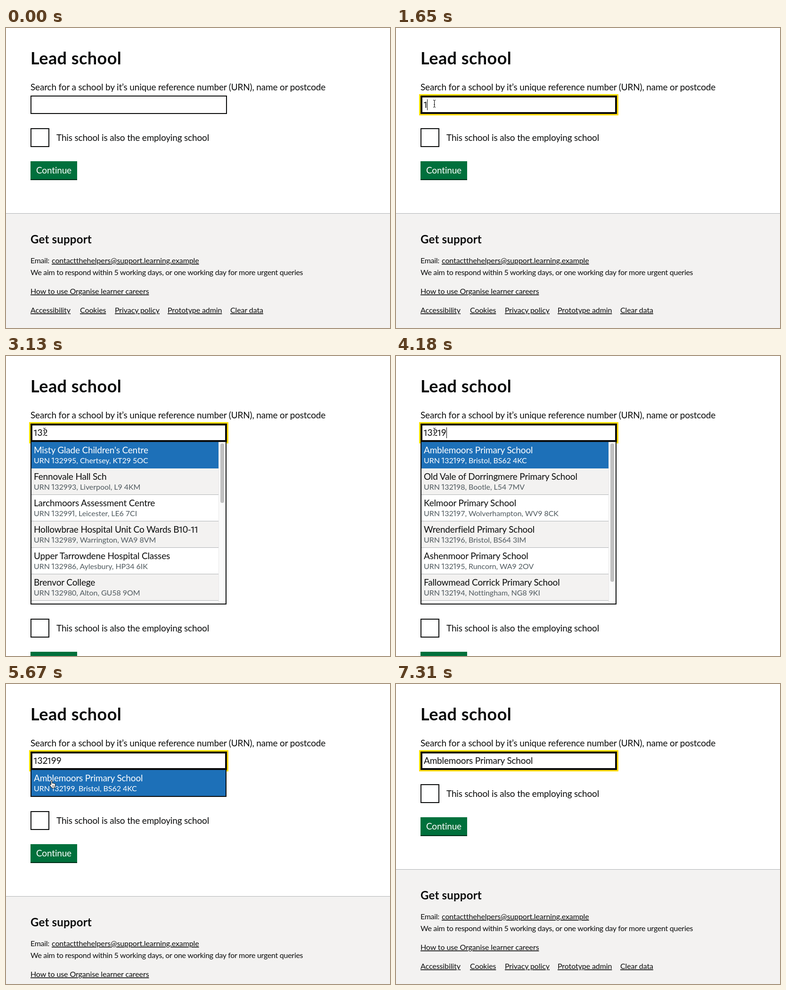
An HTML page that plays this animation: 815 px wide and 635 px high, repeating every 7.41 s.

```html
<!DOCTYPE html>
<html lang="en">
<head>
<meta charset="utf-8">
<title>Lead school</title>
<style>
  html, body { margin: 0; width: 100%; height: 100%; overflow: hidden; background: #fff; }
  svg { display: block; width: 100%; height: 100%; }
  text { font: 19px Lato, sans-serif; fill: #0b0c0c; letter-spacing: -.17px; white-space: pre; }
  .title { font-size: 36px; font-weight: 700; letter-spacing: .45px; }
  .head { font-size: 24px; font-weight: 700; letter-spacing: .2px; }
  .small { font-size: 16px; letter-spacing: -.28px; }
  .link { letter-spacing: -.1px; text-decoration: underline 1px; text-underline-offset: .1578em; }
  .sub { font-size: 16px; letter-spacing: -.06px; fill: #505a5f; }
  .white { fill: #fff; }
  .one { font-family: Roboto, sans-serif; letter-spacing: -.085em; }
</style>
</head>
<body>
<svg id="stage" viewBox="0 0 815 635"></svg>
<script>
const LOOP = 7410, INK = "#0b0c0c", GREY = "#f3f2f1", LINE = "#b1b4b6", BLUE = "#1d70b8";
const chosen = "Amblemoors Primary School";

const lists = {
  "13": [
    ["Thornmere Primary School", "139999, Manchester, M82 5KV"],
    ["Velden College", "139997, Oxford, OX9 4CM"],
    ["Ember Academy Tarrow Park", "139995, Bradford, BD6 3KO"],
    ["Fernwick School", "139994, Birmingham, B97 5MC"],
    ["Tarnby High School", "139993, Woking, GU50 7VK"],
    ["Ellinmoor Academy", "139992, Rotherham, S59 2CV"]],
  "132": [
    ["Misty Glade Children's Centre", "132995, Chertsey, KT29 5OC"],
    ["Fennovale Hall Sch", "132993, Liverpool, L9 4KM"],
    ["Larchmoors Assessment Centre", "132991, Leicester, LE6 7CI"],
    ["Hollowbrae Hospital Unit Co Wards B10-11", "132989, Warrington, WA9 8VM"],
    ["Upper Tarrowdene Hospital Classes", "132986, Aylesbury, HP34 6IK"],
    ["Brenvor College", "132980, Alton, GU58 9OM"]],
  "1321": [
    [chosen, "132199, Bristol, BS62 4KC"],
    ["Old Vale of Dorringmere Primary School", "132198, Bootle, L54 7MV"],
    ["Kelmoor Primary School", "132197, Wolverhampton, WV9 8CK"],
    ["Wrenderfield Primary School", "132196, Bristol, BS64 3IM"],
    ["Ashenmoor Primary School", "132195, Runcorn, WA9 2OV"],
    ["Fallowmead Corrick Primary School", "132194, Nottingham, NG8 9KI"]]
};
lists["13219"] = lists["1321"];
lists["132199"] = lists["1321"].slice(0, 1);
const thumbs = { "13": 126, "132": 126, "1321": 172, "13219": 293 };

// Timelines: each row holds from its time until the next row
const typing = [[0, ""], [1650, "1"], [2390, "13"], [2540, "132"], [3280, "1321"],
  [4180, "13219"], [4480, "132199"], [5820, chosen]];
const caret = [[0, 0], [900, 59], [1350, 0], [1650, 66], [2390, 77], [2540, 88], [3130, 0],
  [3280, 95], [3730, 0], [4180, 107], [4480, 119], [4920, 0], [5520, 119], [5670, 0],
  [5820, 290], [6420, 0], [6870, 290], [7310, 0]];
const pointer = [[0, ""], [450, "arrow", 35, 165], [600, "beam", 68, 155], [750, "beam", 78, 152],
  [5220, "beam", 86, 160], [5370, "beam", 90, 166], [5520, "hand", 91, 198], [5670, "hand", 91, 203],
  [5820, "arrow", 94, 202], [6270, "arrow", 109, 366], [6420, "hand", 253, 597], [6570, ""]];

const at = (rows, t) => rows.findLast(row => row[0] <= t);

const rect = (x, y, w, h, fill, more = "") =>
  `<rect x="${x}" y="${y}" width="${w}" height="${h}" fill="${fill}" ${more}/>`;
const box = (x, y, w, h, b) =>
  rect(x + b / 2, y + b / 2, w - b, h - b, "#fff", `stroke="${INK}" stroke-width="${b}"`);
const text = (x, y, str, cls = "") => `<text x="${x}" y="${y}" class="${cls}">` +
  str.replace(/1/g, '<tspan class="one" dx="-.08em">1</tspan>') + "</text>";

const beam = "M1 .5q2.5 0 2.5 2V14q0 2-2.5 2M6 .5q-2.5 0-2.5 2V14q0 2 2.5 2M2.2 10h2.6";
const shapes = {
  arrow: '<path d="M1.5 1v14.2l3.3-3.2 2.1 5 2.4-1-2.1-4.9h4.6z" stroke="#fff"/>',
  beam: `<path d="${beam}" fill="none" stroke="#fff" stroke-width="2.6"/>
    <path d="${beam}" fill="none" stroke="#000"/>`,
  hand: `<path d="M4.5 10.5V2.5a1.3 1.3 0 0 1 2.6 0V7.2q1.3-1 2.4.2 1.3-.6 2.2.5 1.8-.3 2 1.4v3.2
    q-.2 2-1.4 3.2v1.5H6.2q-1-2.3-3.8-5.2-1.6-2 .3-2.4 1.2 0 1.8.9z" fill="#fff" stroke="#000"/>
    <path d="M7.6 11.5v3M9.4 11.5v3M11.2 11.5v3" stroke="#000" stroke-width=".7"/>`
};

const header = text(52, 77, "Lead school", "title") +
  text(52, 132, "Search for a school by it’s unique reference number (URN), name or postcode");

const links = [[52, "Accessibility"], [157, "Cookies"], [231, "Privacy policy"],
  [343, "Prototype admin"], [476, "Clear data"]];
const lower = box(52, 212, 40, 40, 2) +
  text(107, 239, "This school is also the employing school") +
  rect(52, 282, 99, 38, "#00703c") + rect(52, 320, 99, 2, "#002d18") +
  text(64, 308, "Continue", "white") +
  rect(0, 392, 815, 243, GREY) + rect(0, 392, 815, 1, LINE) +
  text(52, 456, "Get support", "head") +
  text(52, 498, "Email:", "small") +
  text(97, 498, "contactthehelpers@support.learning.example", "small link") +
  text(52, 523, "We aim to respond within 5 working days, or one working day for more urgent queries", "small") +
  text(52, 563, "How to use Organise learner careers", "small link") +
  links.map(([x, label]) => text(x, 603, label, "small link")).join("");

function menu(items, thumb) {
  const inner = thumb ? 342 : 55, width = thumb ? 397 : 412;
  let out = rect(52, 182, 416, inner + 2, INK) + rect(54, 182, 412, inner, "#fff");
  items.forEach(([name, detail], i) => {
    const y = 182 + 56 * i, white = i ? "" : "white";
    out += rect(54, y, width, thumb ? 56 : 55, i ? (i % 2 ? GREY : "#fff") : BLUE);
    if (i) out += rect(54, y + 55, width, 1, LINE);
    out += text(59, y + 24, name, white) + text(59, y + 45, "URN " + detail, "sub " + white);
  });
  if (thumb) out += rect(451, 182, 15, 342, "#fafafa") + rect(451, 182, 1, 342, "#e8e8e8") +
    rect(455, 185, 8, thumb, "#c1c1c1", 'rx="4"');
  return out;
}

function draw(t) {
  const value = at(typing, t)[1], caretX = at(caret, t)[1], [, kind, px, py] = at(pointer, t);
  const items = lists[value], thumb = thumbs[value], focus = t >= 900;
  const shift = items ? (thumb ? 344 : 57) : 0;
  return header + `<g transform="translate(0 ${shift})">${lower}</g>` +
    (focus ? rect(49, 140, 423, 45, "#fd0") : "") + box(52, 143, 417, 39, focus ? 4 : 2) +
    text(59, 169, value) +
    (items ? menu(items, thumb) : "") +
    (caretX ? rect(caretX, 151, 1, 23, "#000") : "") +
    (kind ? `<g transform="translate(${px} ${py})">${shapes[kind]}</g>` : "");
}

const stage = document.getElementById("stage"), start = performance.now();
let shown = "";
function tick() {
  const next = draw((performance.now() - start) % LOOP);
  if (next !== shown) stage.innerHTML = shown = next;
  requestAnimationFrame(tick);
}
tick();
</script>
</body>
</html>
```
